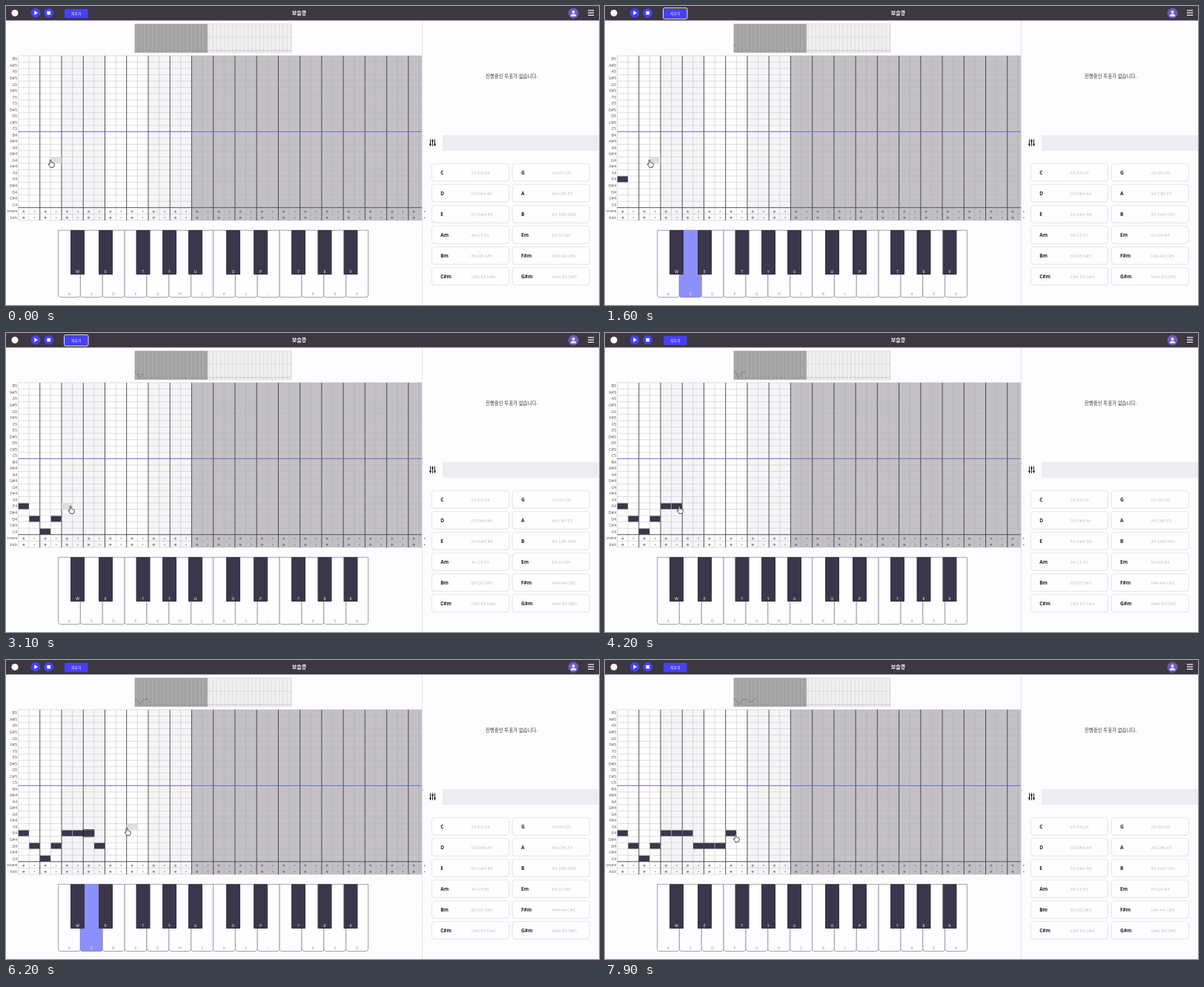
Write an HTML page that moves like this. It is 800 by 403 pixels and loops after 8 s.

```html
<!DOCTYPE html>
<html lang="ko">
<head>
<meta charset="utf-8">
<style>
html, body { margin: 0; width: 100%; height: 100%; overflow: hidden; background: #fdfcfe; }
svg { display: block; width: 100vw; height: 100vh; }
text { font-family: "Open Sans", "Noto Sans CJK KR", "Noto Sans CJK", sans-serif; }
</style>
</head>
<body>
<svg id="stage" viewBox="0 0 800 403"></svg>
<script>
const LOOP = 8000, STEP = 100;
const X0 = 16.5, Y0 = 67, CW = 14.62, RH = 8.53, RIGHT = 561;
const MAP = { x: 174, y: 24, w: 211, h: 39, col: 2.63, row: 1.5 };
const INK = '#3b364a', BLUE = '#4640fb';
const stage = document.getElementById('stage');

function add(tag, attrs, parent = stage) {
  const el = document.createElementNS('http://www.w3.org/2000/svg', tag);
  for (const k in attrs) el.setAttribute(k, attrs[k]);
  parent.appendChild(el);
  return el;
}
const rect = (x, y, width, height, fill, more) => add('rect', { x, y, width, height, fill, ...more });
const circle = (cx, cy, r, fill, more) => add('circle', { cx, cy, r, fill, ...more });
const path = (d, fill, more) => add('path', { d, fill, ...more });
const line = (x1, y1, x2, y2, stroke, w = 1) =>
  add('line', { x1, y1, x2, y2, stroke, 'stroke-width': w });
function text(str, x, y, size, fill, more) {
  const el = add('text', { x, y, fill, 'font-size': size, ...more });
  el.textContent = str;
  return el;
}
const mid = { 'text-anchor': 'middle' };
const show = (el, on) => el.setAttribute('visibility', on ? 'visible' : 'hidden');
const colX = c => X0 + c * CW;
const rowY = r => Y0 + r * RH;

function drawHeader() {
  rect(0, 0, 800, 19.5, '#3c3740');
  circle(12, 9.5, 4.5, '#fff');
  circle(40, 9.3, 6.3, BLUE);
  path('M38.3 6.3L43 9.3L38.3 12.3Z', '#fff');
  circle(57.7, 9.3, 6.3, BLUE);
  rect(55.4, 7, 4.6, 4.6, '#fff');
  rect(79, 4, 31.5, 12.3, BLUE, { rx: 1.5 });
  text('지우기', 94.8, 11.9, 5, '#fff', mid);
  text('보슬콩', 395.5, 11.8, 7.1, '#fff', { ...mid, 'font-weight': 700 });
  circle(765.5, 9.8, 7, '#7059c1');
  circle(765.5, 8, 2.1, '#e6e0f6');
  path('M761.6 14a3.9 3.6 0 0 1 7.8 0z', '#e6e0f6');
  for (const y of [6, 9.2, 12.4]) line(785, y, 793.2, y, '#fff', 1.2);
}

function drawMap() {
  const { x, y, w, h, col } = MAP;
  rect(x, y, w, h, '#f1f0f1');
  rect(x, y, 98, h, '#a9a8a9');
  for (let i = 0; i <= 40; i++) {
    const lx = x + i * col * 2;
    line(lx, y, lx, y + h, lx < x + 98 ? '#929192' : '#d3d2d4', 0.6);
  }
  line(x, y + 18, x + w, y + 18, '#9a9aa8', 0.25);
  line(x, y + 36, x + w, y + 36, '#8b8b8b', 0.4);
  add('rect', { x, y, width: w, height: h, fill: 'none', stroke: '#c4c3c5', 'stroke-width': 0.4 });
}

function drawGrid() {
  const bottom = 289, w = RIGHT - X0, grey = colX(16);
  rect(X0, Y0, w, bottom - Y0, '#fff');
  for (const c of [4, 12]) rect(colX(c), Y0, CW * 4, bottom - Y0, '#f5f4f6');
  rect(grey, Y0, RIGHT - grey, bottom - Y0, '#c3c1c6');
  for (let r = 0; r <= 26; r++) {
    const y = rowY(r);
    line(X0, y, grey, y, '#d0cfd2', 0.7);
    line(grey, y, RIGHT, y, '#b7b5bb', 0.6);
  }
  for (let c = 0; c <= 37; c++) {
    const x = colX(c), heavy = c % 2 === 0 && c > 0;
    line(x, Y0, x, bottom, heavy ? '#3f3d42' : c < 16 ? '#cbcacd' : '#b2b0b6', heavy ? 0.9 : 0.7);
    for (const y of [277, 285.3])
      circle(x + CW / 2, y, c % 2 ? 0.9 : 1.6, c < 16 ? '#99989b' : '#858389');
  }
  line(X0, rowY(24), RIGHT, rowY(24), '#4b494e', 0.9);
  line(X0, rowY(12), RIGHT, rowY(12), '#6464d8', 0.9);

  const names = ['B', 'A#', 'A', 'G#', 'G', 'F#', 'F', 'E', 'D#', 'D', 'C#', 'C'];
  const labels = [5, 4].flatMap(o => names.map(n => n + o)).concat('snare', 'kick');
  labels.forEach((s, i) =>
    text(s, 15.2, rowY(i) + 6.4, 5.4, '#555', { 'text-anchor': 'end' }));
}

function drawPanel() {
  line(561.5, 20, 561.5, 403, '#dcdbde', 0.8);
  text('진행중인 투표가 없습니다.', 682, 97.4, 6.45, '#333', mid);
  rect(589, 174, 211, 21, '#edecee');
  circle(562, 175, 0.7, '#aaa');
  [[572.5, 186.5], [575.5, 182], [578.5, 186.5]].forEach(([x, y]) => {
    line(x, 179.5, x, 189, '#222', 1);
    line(x - 1.4, y, x + 1.4, y, '#222', 1.5);
  });
  const chords = [
    ['C', 'C4 E4 G4'], ['G', 'G4 B4 D5'], ['D', 'D4 F#4 A4'], ['A', 'A4 C#5 E5'],
    ['E', 'E4 G#4 B4'], ['B', 'B4 D#5 F#5'], ['Am', 'A4 C5 E5'], ['Em', 'E4 G4 B4'],
    ['Bm', 'B4 D5 F#5'], ['F#m', 'F#4 A4 C#5'], ['C#m', 'C#4 E4 G#4'], ['G#m', 'G#4 B4 D#5']
  ];
  chords.forEach(([name, notes], i) => {
    const x = 574.5 + (i % 2) * 108.8, y = 212.5 + Math.floor(i / 2) * 28;
    rect(x - 0.8, y - 0.5, 105.6, 25, '#f1eff3', { rx: 4.5 });
    rect(x, y, 104, 23.5, '#fefdff', { rx: 4, stroke: '#e3e1e6', 'stroke-width': 0.7 });
    text(name, x + 11.7, y + 14.2, 6.5, '#222', { 'font-weight': 700 });
    text(notes, x + 53.4, y + 14.1, 6, '#9a999c', { 'font-weight': 300 });
  });
}

// Returns the highlight group of each white key, by label.
function drawPiano() {
  const left = 70.5, w = 29.86, lit = {};
  [..."ASDFGHJKL;'456"].forEach((s, i) => {
    const x = left + i * w;
    const d = `M${x} 302.3h${w}v87.2q0 3-3 3h${6 - w}q-3 0-3-3z`;
    path(d, '#fefdff', { stroke: '#8d8b91', 'stroke-width': 0.8 });
    text(s, x + w / 2, 389.6, 5, '#888', mid);
    const g = add('g', {});
    g.append(path(d, '#8b90fd', { stroke: '#777bd0', 'stroke-width': 0.5 }),
      text(s, x + w / 2, 389.6, 5, '#fff', mid));
    lit[s] = g;
  });
  const xs = [87, 125, 175.5, 211, 246, 297, 334, 385, 420.5, 455.5];
  [...'WETYUOP789'].forEach((s, i) => {
    rect(xs[i], 302, 19, 60, INK, { rx: 0.8 });
    text(s, xs[i] + 9.5, 360, 5, '#fff', mid);
  });
  return lit;
}

// Each entry: time the note shows, column, row, and the key that played it.
const notes = [
  [1000, 0, 19, 'D'], [1700, 1, 21, 'S'], [1900, 2, 23, 'A'], [2400, 3, 21, 'S'],
  [3500, 4, 19], [4200, 5, 19], [4800, 6, 19],
  [5600, 7, 21, 'S'], [6300, 8, 21, 'S'], [6900, 9, 21, 'S'], [7600, 10, 19]
];
// Pointer tip: time, x, y
const trail = [
  [0, 60, 207], [2500, 60, 207], [2800, 88, 234], [3000, 88, 234], [3100, 87, 233],
  [3600, 87, 233], [4000, 100, 233], [4200, 100, 233], [4400, 114, 233], [4800, 114, 233],
  [5100, 163, 226], [7100, 163, 226], [7500, 176, 235], [LOOP, 176, 235]
];

function pointerAt(t) {
  const i = trail.findIndex(k => k[0] > t);
  const [a, x, y] = trail[i - 1], [b, u, v] = trail[i];
  const p = (t - a) / (b - a), e = p * p * (3 - 2 * p);
  return [x + (u - x) * e, y + (v - y) * e];
}

drawHeader();
const ring = rect(78.5, 2.6, 32.5, 14.8, 'none', { rx: 2, stroke: '#fff', 'stroke-width': 0.9 });
drawMap();
drawGrid();
const hover = rect(0, 0, CW, RH, '#dfdee0');
const noteEls = notes.map(([, c, r]) => [
  rect(colX(c) + 0.2, rowY(r) + 0.4, CW - 0.5, RH - 0.6, INK),
  rect(MAP.x + c * MAP.col, MAP.y + r * MAP.row, MAP.col - 0.3, 1.1, '#77757c')
]);
const cellRing = rect(colX(6), rowY(19) - 0.2, CW, RH + 0.6, 'none', { rx: 0.6, stroke: '#111', 'stroke-width': 1 });
drawPanel();
const keys = drawPiano();
const hand = path(
  'M-.9 .8Q0-.6.9.8V4Q2 3.4 2.5 4.3Q3.5 3.9 4 4.8Q5.2 4.6 5.2 5.8V7.6Q5 9 4.2 10.3H-.3Q-1.2 8.5-2.6 6.9Q-3.1 5.5-1.9 5.7L-.9 6.4Z',
  '#fff', { stroke: '#222', 'stroke-width': 0.8, 'stroke-linejoin': 'round' });

function render(t) {
  const down = new Set();
  notes.forEach(([at, , , key], i) => {
    noteEls[i].forEach(el => show(el, t >= at));
    if (key && Math.abs(t - at + 0.5) <= 100) down.add(key);
  });
  for (const k in keys) show(keys[k], down.has(k));
  show(ring, t >= 900 && t < 3500);
  show(cellRing, t >= 5500 && t < 7600);

  const [x, y] = pointerAt(t);
  hand.setAttribute('transform', `translate(${x} ${y})`);
  hover.setAttribute('x', colX(Math.floor((x + 1 - X0) / CW)));
  hover.setAttribute('y', rowY(Math.floor((y - Y0) / RH)));
}

function tick() {
  render(Math.floor((performance.now() % LOOP) / STEP) * STEP);
  requestAnimationFrame(tick);
}
tick();
</script>
</body>
</html>
```
